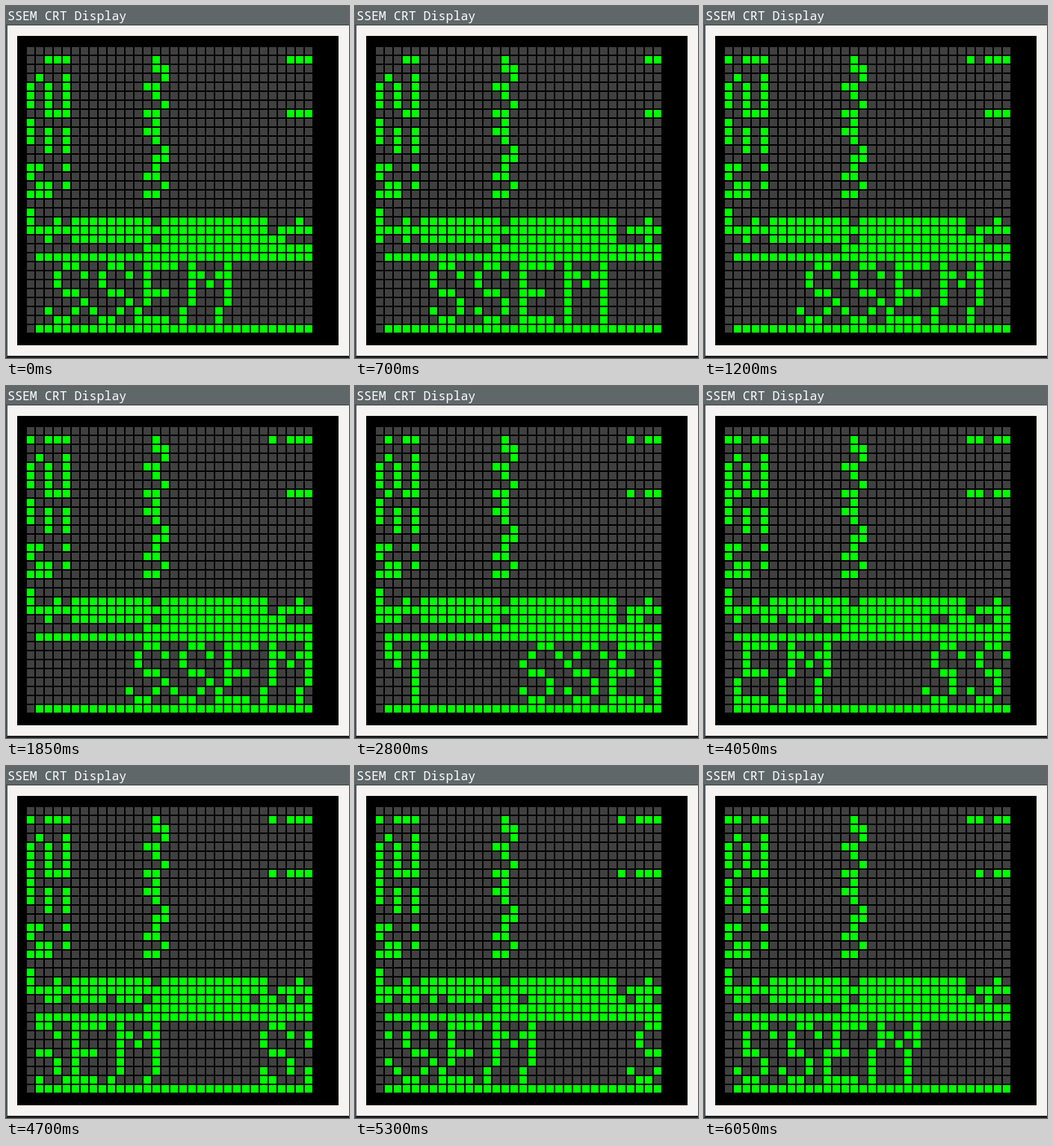
Animation of 459 by 471 pixels, one loop 6100 ms. Source, as an HTML page with a canvas:

```html
<!DOCTYPE html>
<html>
<head>
<meta charset="utf-8">
<title>SSEM CRT Display</title>
<style>
html, body { margin: 0; width: 100%; height: 100%; overflow: hidden; background: #f6f4f2; }
body { position: relative; }
#frame { position: absolute; inset: 0; box-sizing: border-box; border-left: 2px solid #50585a; border-bottom: 3px solid #1c1e1f; }
#title { position: absolute; left: 0; top: 0; width: 100%; height: 26px; box-sizing: border-box; padding-left: 2px;
  background: #5f6769; border-bottom: 1px solid #3c4244; color: #fff; white-space: pre;
  font: 16.6px/26px "Noto Sans Mono", "DejaVu Sans Mono", monospace; }
canvas { position: absolute; left: 15px; top: 40px; }
</style>
</head>
<body>
<div id="frame"></div>
<div id="title">SSEM CRT Display</div>
<canvas id="crt" width="430" height="414"></canvas>
<script>
// A 32-word Manchester Baby running a program that rotates the text rows.
const OPS = ["JMP", "JRP", "LDN", "STO", "SUB", "SUB", "CMP", "STP"];
const PROGRAM = `JMP 0,LDN 0,CMP 0,SUB 18,STO 21,LDN 21,SUB 21,STO 28,LDN 1,STO 21,LDN 21,SUB 20,
CMP 0,LDN 19,STO 1,SUB 22,STO 7,JMP 0`.split(",").map(line => {
  const [op, addr] = line.trim().split(" ");
  return OPS.indexOf(op) << 13 | addr;
});
const TEXT = [
  ".##. .##. #### #...#",
  "#..# #..# #... ##.##",
  "#... #... #... #.#.#",
  ".##. .##. ###. #...#",
  "...# ...# #... #...#",
  "#..# #..# #... #...#",
  ".##. .##. #### #...#"
];
const FIRST = 23 | 1 << 14 | 23 << 27;  // "LDN 23" with the row number repeated in the top bits
const WARM_UP = 84;

function boot() {
  const mem = new Int32Array(32);
  mem.set(PROGRAM);
  mem[1] = FIRST;
  mem[7] = FIRST + (1 << 13);
  mem[18] = 1;
  mem[19] = -FIRST;
  mem[20] = ~(1 << 27);
  mem[22] = -(1 << 13);
  mem[23] = mem[31] = -2;
  TEXT.forEach((row, r) => [...row].forEach((c, i) => {
    if (c === "#") mem[24 + r] |= 1 << i + 2;
  }));
  return mem;
}

function run(steps) {
  const mem = boot();
  let ci = 0, acc = 0;
  while (steps-- > 0) {
    ci = ci + 1 & 31;
    const word = mem[ci], addr = word & 31;
    switch (OPS[word >> 13 & 7]) {
      case "JMP": ci = mem[addr]; break;
      case "JRP": ci += mem[addr]; break;
      case "LDN": acc = -mem[addr] | 0; break;
      case "STO": mem[addr] = acc; break;
      case "SUB": acc = acc - mem[addr] | 0; break;
      case "CMP": if (acc < 0) ci++; break;
    }
  }
  return mem;
}

// [tick, instructions executed]; the display hangs from tick 24 to 29
const TICK = 50, TICKS = 122, HANG = 24, RESUME = 29;
const PACE = [[0, 0], [14, 485], [24, 832], [29, 969], [37, 1247], [56, 1907], [81, 2775], [106, 3646], [121, 4170]];

function stepsAt(tick) {
  if (tick > HANG && tick < RESUME) tick = HANG;
  const i = PACE.findIndex(p => p[0] >= tick);
  if (i === 0) return 0;
  const [t0, n0] = PACE[i - 1], [t1, n1] = PACE[i];
  return Math.floor(n0 + (n1 - n0) * (tick - t0) / (t1 - t0) + 1e-6);
}

const ctx = document.getElementById("crt").getContext("2d");

function draw(tick) {
  const mem = run(WARM_UP + stepsAt(tick));
  ctx.fillStyle = "#000";
  ctx.fillRect(0, 0, 430, 414);
  for (let y = 0; y < 32; y++) {
    for (let x = 0; x < 32; x++) {
      ctx.fillStyle = mem[y] >>> x & 1 ? "#0f0" : "#404040";
      ctx.fillRect(13 + x * 12, 15 + y * 12, 10, 10);
    }
  }
}

const start = performance.now();
let shown = -1;
function loop() {
  const tick = Math.floor((performance.now() - start) / TICK) % TICKS;
  if (tick !== shown) draw(shown = tick);
  requestAnimationFrame(loop);
}
loop();
</script>
</body>
</html>
```
